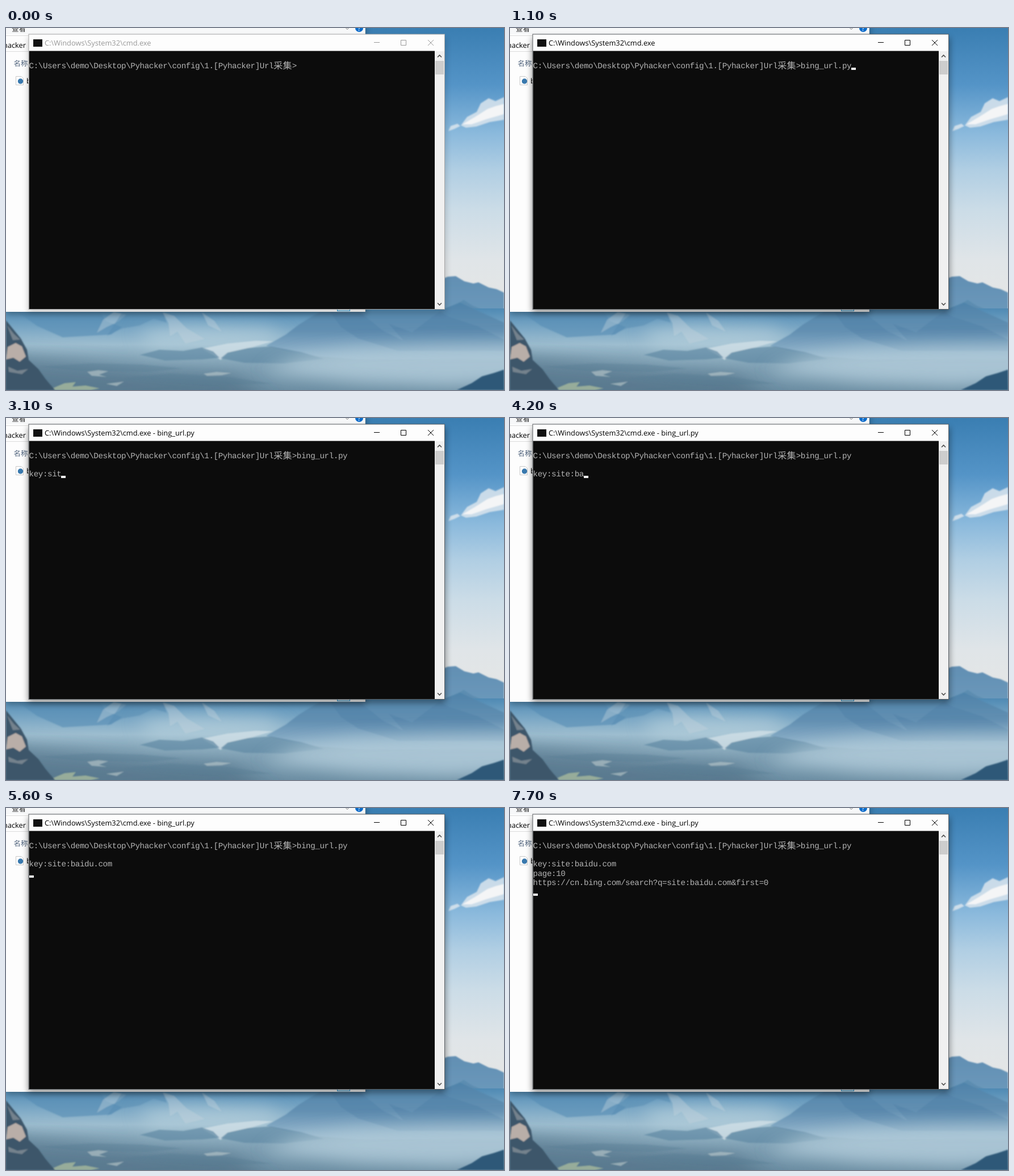
Recreate the animation shown at these times as an HTML page. Size 877 by 639 pixels, loop 8000 ms.

```html
<!DOCTYPE html>
<html lang="zh">
<head>
<meta charset="utf-8">
<title>Console session</title>
<style>
  html, body { margin: 0; width: 100%; height: 100%; overflow: hidden; }
  svg { display: block; width: 877px; height: 639px; }
  text { text-rendering: geometricPrecision; white-space: pre; }
  .ui { font: 12.8px "Open Sans", "Noto Sans", "Noto Sans CJK SC", sans-serif; }
  .cjk { font: 12.5px "Noto Sans CJK SC", "Noto Sans CJK", sans-serif; }
  .mono { font: 14.2px "Liberation Mono", "Noto Sans Mono", monospace; fill: #b4b4b4; }
  .mono .wide { font: 300 16px "Noto Sans CJK SC", "Noto Sans CJK", sans-serif; }
  .line { fill: none; stroke-width: 1; }
  #frame { stroke: #a5a5a5; }
  .on #frame { stroke: #5a5f63; }
  #title, #buttons { fill: #999; stroke: #999; }
  #title { stroke: none; }
  .on #title { fill: #000; }
  .on #buttons { stroke: #000; }
  #buttons path { fill: none; }
  #shadow { opacity: .2; }
  .on #shadow { opacity: .42; }
</style>
</head>
<body>
<svg viewBox="0 0 877 639" xmlns="http://www.w3.org/2000/svg">
  <defs>
    <linearGradient id="sky" x2="0" y2="1">
      <stop offset="0" stop-color="#3a7eb2"/>
      <stop offset=".2" stop-color="#5494c7"/>
      <stop offset=".37" stop-color="#8ab9dc"/>
      <stop offset=".5" stop-color="#b0cee3"/>
      <stop offset=".64" stop-color="#cbdce7"/>
      <stop offset=".82" stop-color="#e0e5e8"/>
      <stop offset="1" stop-color="#e5e6e5"/>
    </linearGradient>
    <linearGradient id="ridge" x2="0" y2="1">
      <stop offset="0" stop-color="#628fb3"/>
      <stop offset=".6" stop-color="#6c9abc"/>
      <stop offset="1" stop-color="#7fa9c6"/>
    </linearGradient>
    <linearGradient id="slope" x2="0" y2="1">
      <stop offset="0" stop-color="#4f83aa"/>
      <stop offset=".5" stop-color="#6390b2"/>
      <stop offset="1" stop-color="#9bbbd0"/>
    </linearGradient>
    <linearGradient id="haze" x2="0" y2="1">
      <stop offset="0" stop-color="#4f8ab4"/>
      <stop offset=".25" stop-color="#7ca8c5"/>
      <stop offset=".44" stop-color="#9dbdcf"/>
      <stop offset=".6" stop-color="#88a9bc"/>
      <stop offset="1" stop-color="#6b8da2"/>
    </linearGradient>
    <filter id="soft1" x="-20%" y="-20%" width="140%" height="140%"><feGaussianBlur stdDeviation="1"/></filter>
    <filter id="soft6" x="-20%" y="-50%" width="140%" height="200%"><feGaussianBlur stdDeviation="6"/></filter>
    <filter id="soft15" x="-20%" y="-80%" width="140%" height="260%"><feGaussianBlur stdDeviation="15"/></filter>
  </defs>

  <!-- wallpaper -->
  <rect width="877" height="500" fill="url(#sky)"/>
  <g filter="url(#soft1)">
    <path fill="#dbe6ee" opacity=".85" d="M779 182 783 173 795 169 800 173 790 178ZM801 172 812 157 829 148 836 133 850 124 862 129 877 122V162L852 166 828 174 810 176Z"/>
    <path fill="#f4f5f6" d="M804 170 826 157 848 143 862 138 877 134V152L846 161 820 170Z"/>
    <path fill="url(#ridge)" d="M760 446 778 439 792 438 807 447 823 451 832 449 850 458 864 461 877 467V560H760Z"/>
    <path fill="#5587ac" opacity=".6" d="M760 501 790 489 806 480 822 490 846 500 877 525V560H760Z"/>
  </g>
  <rect y="495" width="877" height="144" fill="url(#haze)"/>
  <g filter="url(#soft15)">
    <path fill="#b7d0dd" opacity=".7" d="M230 535 320 525 460 530 500 555 400 570 260 565Z"/>
    <path fill="#47697f" opacity=".55" d="M-30 575 130 590 260 605 400 612 470 660H-30Z"/>
  </g>
  <g filter="url(#soft1)">
    <path fill="#568cb4" opacity=".6" d="M20 501H165L176 517 204 528 185 541 100 546 55 526Z"/>
    <path fill="#c4d3dc" opacity=".4" d="M190 501 212 506 198 518 177 528 160 538 171 515ZM276 502 296 508 318 530 350 549 316 557 302 536 289 544 286 521ZM345 502 367 517 380 536 356 525Z"/>
    <path fill="#568cb2" opacity=".5" d="M205 501H276L283 520 260 513 235 525 205 530 178 543Z"/>
    <path fill="url(#slope)" d="M458 561 493 541 515 524 539 509 555 500H760L800 485 877 520V585H620L520 577Z"/>
    <path fill="#4a7ca3" opacity=".35" d="M570 500 625 503 665 535 700 552 674 522 715 537 764 500 780 510 830 526 877 550V570H690L620 548 590 528Z"/>
    <path fill="#d0dfe6" opacity=".8" d="M345 566 390 557 440 552 470 553 435 563 392 573 378 586 365 577Z"/>
    <path fill="#6089a4" opacity=".7" d="M236 577 270 568 312 570 345 564 365 571 376 582 345 585 280 587ZM378 583 390 573 426 565 466 562 520 572 560 584 490 592 420 591Z"/>
  </g>
  <path filter="url(#soft15)" fill="#adc8d7" opacity=".9" d="M450 605 520 580 610 566 750 560 910 558V625L780 632 620 625Z"/>
  <g filter="url(#soft1)">
    <path fill="#587b92" opacity=".35" d="M60 598 150 592 240 594 310 601 250 607 130 605ZM210 618 290 610 390 616 470 628 350 630Z"/>
    <path fill="#bccacb" opacity=".6" d="M143 607 163 604 180 606 164 612 178 616 151 614ZM348 610 371 607 397 609 380 613 354 614ZM176 628 208 624 195 632Z"/>
    <path fill="#a7b99d" opacity=".8" d="M84 635 103 627 123 625 117 633 140 631 165 636 150 639H86Z"/>
    <path fill="#3d576b" d="M0 516 13 532 26 548 37 568 40 586 57 602 70 620 86 639H0Z"/>
    <path fill="#b9aea8" d="M3 563 17 556 28 562 35 580 24 589 13 582 0 585Z"/>
    <path fill="#74828d" d="M2 525 14 540 25 550 12 551ZM4 598 20 605 39 602 28 611 5 607Z"/>
    <path fill="#2f5878" d="M794 639 820 627 838 615 859 609 877 603V639Z"/>
  </g>

  <!-- file window -->
  <rect y="-6" width="634" height="511" opacity=".3" filter="url(#soft6)"/>
  <rect width="633" height="501" fill="#fdfdfd"/>
  <rect width="633" height="11" fill="#f7f8f9"/>
  <path class="line" stroke="#dcdcdc" d="M0 13.5H41M0 41.5H41M632.5 0V501"/>
  <text class="cjk" x="10" y="6" fill="#333">查看</text>
  <text class="ui" x="35" y="35" text-anchor="end">Pyhacker</text>
  <text class="cjk" x="13.5" y="67" fill="#4c607a">名称</text>
  <text class="ui" x="36" y="98">bing_url.py</text>
  <path fill="#fff" stroke="#c9c9c9" d="M17.5 85.5H27L30.5 89V100.5H17.5Z"/>
  <circle cx="25.5" cy="94" r="4.7" fill="#3979ae"/>
  <path class="line" stroke="#777" d="M597.5 -1 601 2.5 604.5 -1"/>
  <circle cx="622" cy="0" r="7" fill="#0a6ccb"/>
  <text class="ui" x="622" y="5" fill="#fff" text-anchor="middle">?</text>
  <rect x="583.5" y="480.5" width="22" height="19" fill="#cce8f7" stroke="#2f96cf"/>

  <!-- console window -->
  <g id="win">
    <rect id="shadow" x="39" y="17" width="735" height="485" filter="url(#soft6)"/>
    <rect x="40" y="11" width="732" height="485" fill="#fdfdfd"/>
    <rect x="48" y="20" width="16" height="13" fill="#111"/>
    <text id="title" class="ui" x="68" y="31"></text>
    <g id="buttons"><path d="M648 25.5H658M695.5 21.5H704.5V30.5H695.5ZM743 21 753 31M753 21 743 31"/></g>
    <rect x="40.5" y="40.5" width="714.5" height="455.5" fill="#0c0c0c"/>
    <rect x="755" y="41" width="17" height="455" fill="#f0f0f0"/>
    <rect x="756" y="58" width="15" height="24" fill="#cdcdcd"/>
    <path class="line" style="stroke-width:1.6" stroke="#505050" d="M760 51.5 763.5 48 767 51.5M760 485.5 763.5 489 767 485.5"/>
    <rect id="frame" class="line" x="40" y="11" width="732.5" height="485.5"/>
    <g id="screen" class="mono"></g>
    <rect id="cursor" width="8" height="4" fill="#f2f2f2"/>
  </g>
</svg>
<script>
const LOOP = 8000, CELL = 8.125, ROW = 16.25, LEFT = 40.5, TOP = 41;
const NS = 'http://www.w3.org/2000/svg';
const $ = id => document.getElementById(id);
const prompt = 'C:\\Users\\demo\\Desktop\\Pyhacker\\config\\1.[Pyhacker]Url采集>';
const script = 'bing_url.py', key = 'key:', page = 'page:';
const site = 'site:baidu.com';
const typed = n => key + site.slice(0, n);

// time, row, text of that row, cursor column (-1 hides it)
const steps = [
  [0, 1, prompt, -1],
  [800, 1, prompt, 58], [900, 1, prompt + 'b', 59],
  [1100, 1, prompt + script, 69],
  [1600, 2, '', 0], [1800, 2, '', -1],
  [1900, 3, key, -1],
  [2800, 3, typed(1), 5], [2900, 3, typed(2), 6],
  [3100, 3, typed(3), 7], [3200, 3, typed(4), -1],
  [3600, 3, typed(5), 9], [3700, 3, typed(5), -1],
  [4200, 3, typed(7), 11], [4400, 3, typed(8), 12],
  [4700, 3, typed(9), 13], [4900, 3, typed(10), 14],
  [5100, 3, typed(11), 15], [5200, 3, typed(12), 16], [5300, 3, typed(13), 17],
  [5500, 3, typed(14), 18],
  [5600, 4, '', 0],
  [5700, 4, page, 5], [6200, 4, page, -1],
  [6400, 4, page + '1', 6], [6500, 4, page + '10', 7], [6600, 4, page + '10', -1],
  [6800, 4, page + '100', 8], [7100, 4, page + '100', -1],
  [7400, 4, page + '10', 7],
  [7600, 5, '', 0],
  [7700, 5, 'https://cn.bing.com/search?q=' + site + '&first=0', -1],
  [7700, 6, '', 0]
];

// each character sits on the console grid; CJK takes two cells
function drawLine(row, text) {
  let col = 0;
  for (const run of text.match(/[\u4e00-\u9fff]+|[^\u4e00-\u9fff]+/g) || []) {
    const wide = run > '\u4e00';
    const node = document.createElementNS(NS, 'text');
    const xs = [];
    for (const c of run) {
      xs.push(LEFT + col * CELL);
      col += wide ? 2 : 1;
    }
    if (wide) node.setAttribute('class', 'wide');
    node.setAttribute('x', xs.join(' '));
    node.setAttribute('y', TOP + row * ROW + (wide ? 14.5 : 13.6));
    node.textContent = run;
    $('screen').append(node);
  }
}

function render(count, active) {
  const lines = {};
  for (const [, row, text] of steps.slice(0, count)) lines[row] = text;
  $('screen').replaceChildren();
  for (const row in lines) drawLine(+row, lines[row]);

  const [time, row, , col] = steps[count - 1];
  const cursor = $('cursor');
  cursor.style.display = col < 0 ? 'none' : '';
  cursor.setAttribute('x', Math.round(LEFT + Math.max(col, 0) * CELL));
  cursor.setAttribute('y', Math.ceil(TOP + (row + 1) * ROW) - 4);

  $('title').textContent = 'C:\\Windows\\System32\\cmd.exe' + (time >= 1600 ? ' - ' + script : '');
  $('win').classList.toggle('on', active);
}

let shown = '';
const start = performance.now();
function tick() {
  const t = Math.max(0, performance.now() - start) % LOOP;
  const count = steps.filter(s => s[0] <= t).length;
  const active = t >= 300;
  const state = count + ':' + active;
  if (state !== shown) render(count, active);
  shown = state;
  requestAnimationFrame(tick);
}
tick();
</script>
</body>
</html>
```
